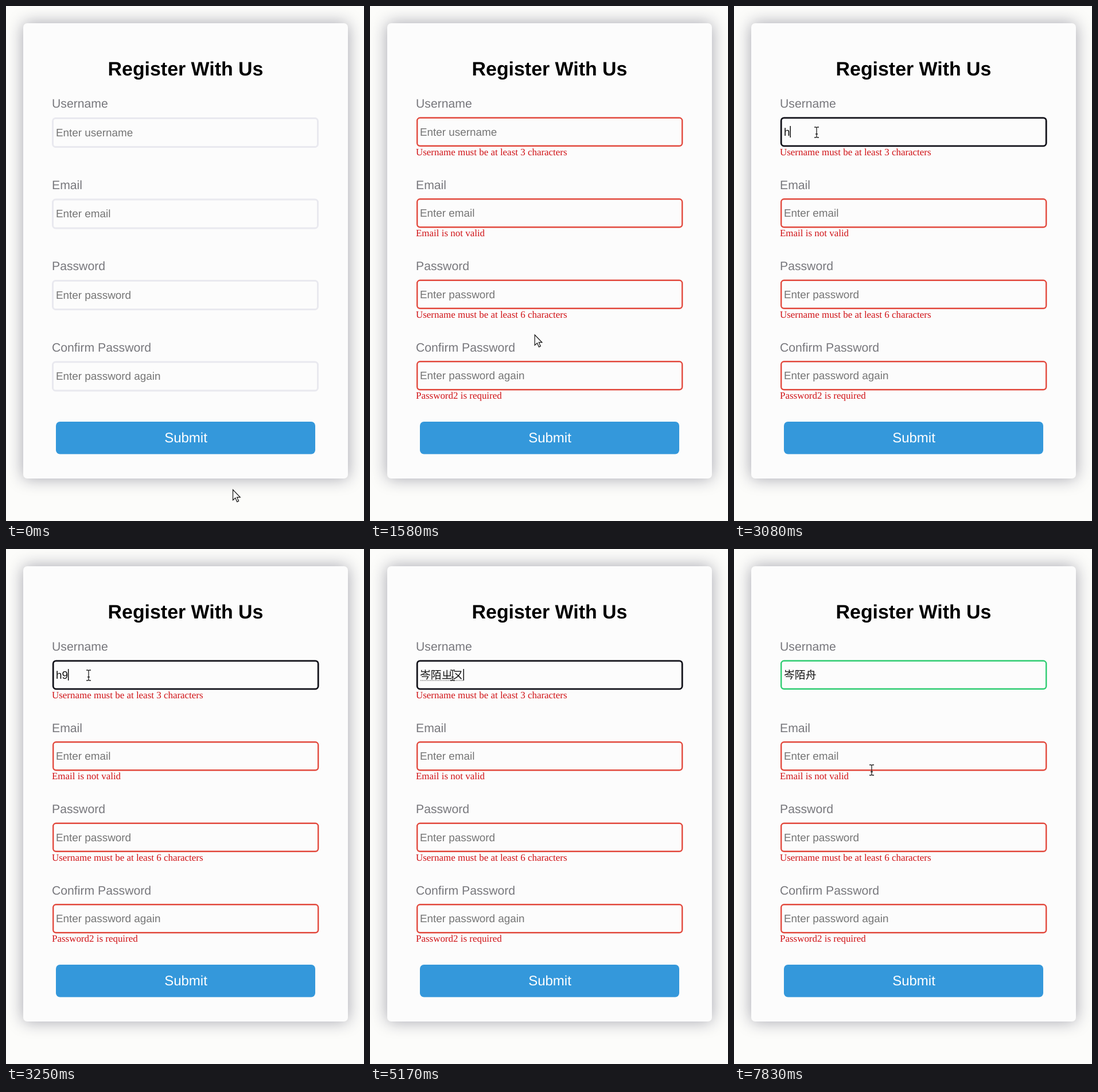
Write an HTML page that moves like this. It is 624 by 897 pixels and loops after 8000 ms.

```html
<!DOCTYPE html>
<html lang="en">
<head>
<meta charset="utf-8">
<title>Register form</title>
<style>
  html, body { margin: 0; width: 100%; height: 100%; overflow: hidden; background: #fcfcfa; }
  svg { display: block; width: 100%; height: 100%; }
  text { font-family: "Liberation Sans", Arial, "Noto Sans CJK TC", "Noto Sans CJK", "Noto Sans CJK JP", sans-serif;
    white-space: pre; text-rendering: geometricPrecision; }
  .card { position: absolute; left: 30px; top: 30px; width: 566px; height: 793px; border-radius: 7px;
    background: #fcfcfc; box-shadow: 0 0 28px rgba(20, 20, 50, .38); }
  .form { position: absolute; left: 0; top: 0; }
  .title { font-size: 33.9px; font-weight: bold; text-anchor: middle; }
  .label { font-size: 21.2px; fill: #77777c; }
  .value { font-size: 18.86px; }
  .error { font: 16.97px "Liberation Serif", "Times New Roman", serif; fill: #d01216; }
  .submit { font-size: 24px; fill: #fff; text-anchor: middle; }
  .item { font: 18.5px "Open Sans", "Noto Sans", sans-serif; fill: #222; }
  .menu { filter: drop-shadow(0 1px 2px rgba(60, 60, 90, .3)); }
</style>
</head>
<body>
<div class="card"></div>
<svg class="form" id="form" viewBox="0 0 624 897"></svg>
<script>
const LOOP = 8000, STEP = 141.5, TEXT_X = 87;
const SUBMIT = 1000, FOCUS = 2080, MENU_OPEN = 2250, MENU_CLOSE = 3080, COMMIT = 5670, RESUBMIT = 6920;

const form = document.getElementById('form');

function add(tag, attrs, text = '', parent = form) {
  const el = document.createElementNS('http://www.w3.org/2000/svg', tag);
  set(el, attrs);
  el.textContent = text;
  return parent.appendChild(el);
}
function set(el, attrs) {
  for (const key in attrs) el.setAttribute(key, attrs[key]);
}
function show(el, on) {
  el.setAttribute('visibility', on ? 'visible' : 'hidden');
}

add('text', { class: 'title', x: 313, y: 121 }, 'Register With Us');

const fields = [
  ['Username', 'Enter username', 'Username must be at least 3 characters'],
  ['Email', 'Enter email', 'Email is not valid'],
  ['Password', 'Enter password', 'Username must be at least 6 characters'],
  ['Confirm Password', 'Enter password again', 'Password2 is required']
].map(([label, hint, message], i) => {
  const dy = i * STEP;
  add('text', { class: 'label', x: 80, y: 177 + dy }, label);
  return {
    dy, hint,
    box: add('rect', { width: 462, rx: 5 }),
    value: add('text', { class: 'value', x: TEXT_X }, hint),
    error: add('text', { class: 'error', x: 80, y: 259.7 + dy }, message)
  };
});

add('rect', { x: 87, y: 724, width: 452, height: 56.5, rx: 7, fill: '#3498db' });
add('text', { class: 'submit', x: 313.5, y: 760 }, 'Submit');

const caret = add('rect', { y: 209, width: 1.4, height: 20, fill: '#000' });
const underline = add('path', { stroke: '#333', 'stroke-width': 1.2, 'stroke-dasharray': '1.4 1.4' });

const menu = add('g', { class: 'menu' });
add('rect', { x: 81.5, y: 247, width: 464, height: 328.5, rx: 6, fill: '#fcfcfc', stroke: '#dedee8' }, '', menu);
['123', '1', '31231', '1111', '11', '213'].forEach((text, i) =>
  add('text', { class: 'item', x: 98, y: 289 + i * 50.9 }, text, menu));

const arrow = add('path', {
  d: 'M.5 .5V18.6L4.7 14.8L7.8 21.6L10.6 20.3L7.6 13.7H13.2Z',
  fill: '#fff', stroke: '#111', 'stroke-width': 1.2
});
const beam = add('path', {
  d: 'M-4 -9H-1.2L0 -8L1.2 -9H4M0 -8V8M-4 9H-1.2L0 8L1.2 9H4M-2 3H2',
  fill: 'none', stroke: '#222', 'stroke-width': 1.3
});

// [start time, text in the username field]
const typing = [
  [0, ''], [3080, 'h'], [3170, 'h9'], [3330, 'h94'], [3580, 'h'], [3750, ''],
  [4170, 'ㄘ'], [4330, 'ㄘㄣ'], [4500, '岑'], [4670, '岑ㄇ'], [4750, '岑ㄇㄛ'],
  [5000, '岑陌'], [5080, '岑陌ㄓ'], [5170, '岑陌ㄓㄡ'], [5420, '岑陌舟']
];

// [time, x, y] stops of the pointer
const path = [
  [0, 395, 842], [80, 395, 842], [500, 372, 772], [670, 371, 768], [830, 369, 756],
  [1330, 369, 756], [1830, 205, 390], [2080, 144, 220], [6210, 144, 220],
  [6400, 6, 440], [6580, 172, 732], [6750, 222, 762], [7000, 230, 755],
  [7210, 230, 755], [7250, 208, 735], [7630, 208, 735], [7670, 68, 352], [7830, 240, 385], [LOOP, 240, 385]
];

function pointerAt(t) {
  const i = path.findIndex(stop => stop[0] > t);
  const [t0, x0, y0] = path[i - 1], [t1, x1, y1] = path[i];
  const k = (t - t0) / (t1 - t0);
  return [x0 + (x1 - x0) * k, y0 + (y1 - y0) * k];
}

function drawField(field, i, t, typed) {
  const checked = t >= SUBMIT, valid = i === 0 && t >= RESUBMIT;
  const focused = i === 0 && t >= FOCUS && !valid;
  const color = valid ? '#2ecc71' : focused ? '#101018' : checked ? '#e2493d' : '#e9e9ef';
  set(field.box, {
    x: checked ? 82.2 : 81.5, y: (checked ? 194.8 : 195.5) + field.dy,
    height: checked ? 49 : 50, fill: '#fcfcfc',
    stroke: color, 'stroke-width': focused ? 2.8 : checked ? 2.4 : 3
  });
  set(field.value, { y: (checked ? 225.5 : 226.5) + field.dy, fill: typed ? '#111' : '#757575' });
  field.value.textContent = typed || field.hint;
  show(field.error, checked && !valid);
}

function draw(t) {
  const typed = typing.filter(step => step[0] <= t).pop()[1];
  fields.forEach((field, i) => drawField(field, i, t, i ? '' : typed));

  const end = TEXT_X + (typed ? fields[0].value.getComputedTextLength() : 0);
  set(caret, { x: end });
  show(caret, t >= FOCUS && t < COMMIT && !(t >= 2670 && t < MENU_CLOSE));
  set(underline, { d: `M88 229H${end}` });
  show(underline, t >= 4170 && t < COMMIT);
  show(menu, t >= MENU_OPEN && t < MENU_CLOSE);

  const [x, y] = pointerAt(t);
  const inField = x > 81 && x < 545 && fields.some(f => y > 194 + f.dy && y < 245 + f.dy);
  const present = t < 7330 || t >= 7670;
  for (const el of [arrow, beam]) set(el, { transform: `translate(${x} ${y})` });
  show(arrow, present && !inField);
  show(beam, present && inField);
}

const start = performance.now();
function tick() {
  draw((performance.now() - start) % LOOP);
  requestAnimationFrame(tick);
}
tick();
</script>
</body>
</html>
```
